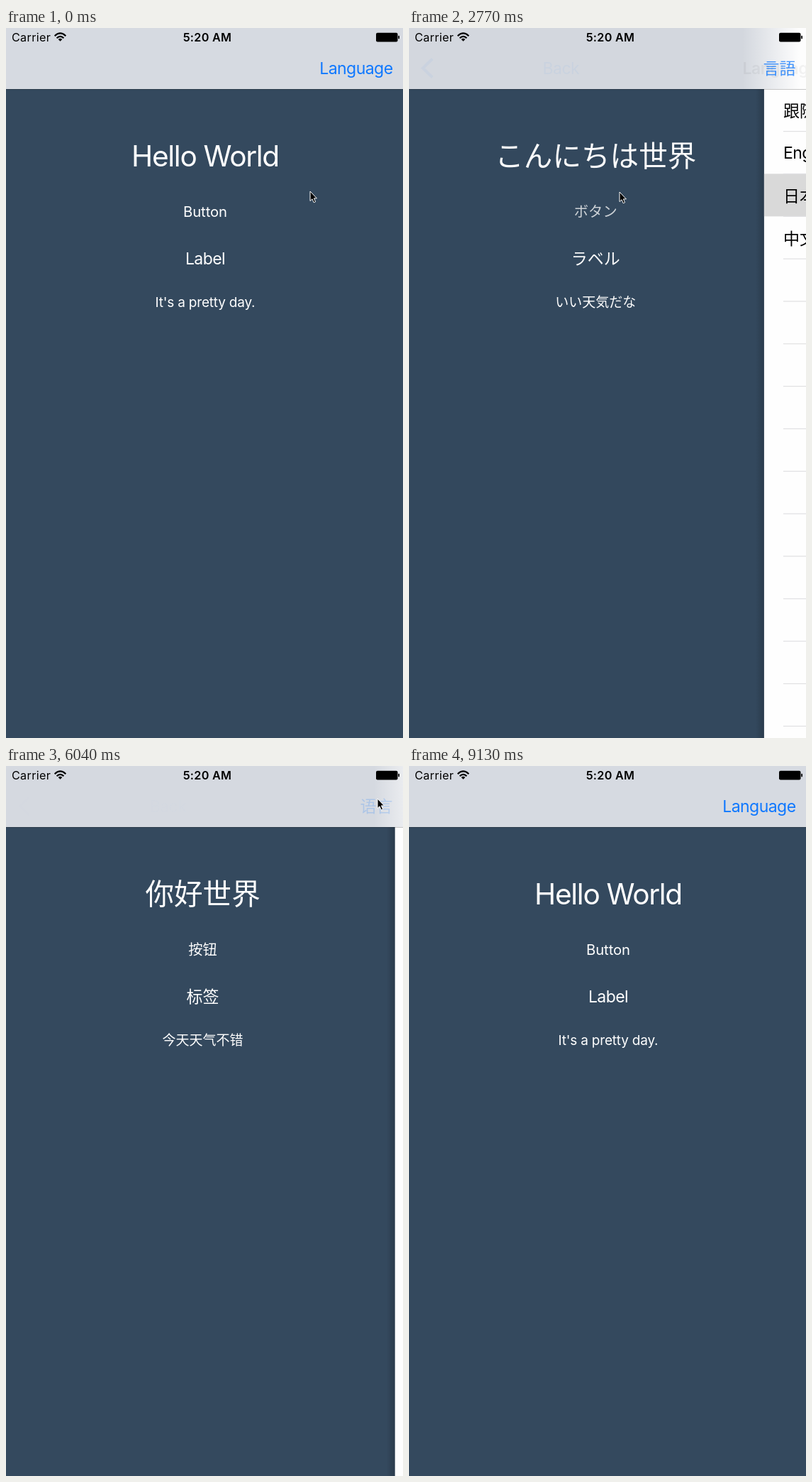
These frames come from a looping animation (560 by 1000 pixels, 9760 ms). An HTML page:

```html
<!DOCTYPE html>
<html lang="en">
<head>
<meta charset="utf-8">
<title>Language switch</title>
<style>
  html, body { margin: 0; height: 100%; overflow: hidden; background: #34495e; }
  svg { display: block; width: 100vw; height: 100vh; font: 23px Inter, "Noto Sans CJK SC", sans-serif; font-optical-sizing: none; }
  text { white-space: pre; }
  .mid { text-anchor: middle; }
  .end { text-anchor: end; }
  .tint { fill: #0f78ff; }
  .en { letter-spacing: -.55px; }
  .ja { font-family: "Noto Sans CJK JP", sans-serif; }
  .zh { font-family: "Noto Sans CJK SC", sans-serif; }
  #heading { font-size: 40.6px; font-weight: 300; }
  #heading.en { font-weight: 400; letter-spacing: -1.3px; }
  #button, #dots { font-size: 20.3px; }
  #button.en { letter-spacing: -.1px; }
  #note { font-size: 19px; }
  #note.en { letter-spacing: -.2px; }
  #title { font-weight: 600; }
  .status { font-size: 16.2px; letter-spacing: .3px; }
</style>
</head>
<body>
<svg viewBox="0 0 560 1000" preserveAspectRatio="none">
  <defs>
    <linearGradient id="glass" gradientUnits="userSpaceOnUse" x1="0" y1="0" x2="80" y2="0">
      <stop offset="0" stop-color="#fdfdfd" stop-opacity="0"/>
      <stop offset="1" stop-color="#fdfdfd"/>
    </linearGradient>
    <linearGradient id="edge">
      <stop offset="0" stop-opacity="0"/>
      <stop offset="1" stop-opacity=".2"/>
    </linearGradient>
  </defs>

  <rect width="560" height="1000" fill="#34495e"/>
  <g id="main" class="mid" fill="#fff">
    <text id="heading" x="281" y="195"/>
    <text id="button" x="281" y="266"/>
    <text id="dots" x="281" y="266" opacity=".2">...</text>
    <text id="label" x="281" y="333"/>
    <text id="note" x="281" y="393"/>
  </g>
  <rect id="dim" width="560" height="1000"/>

  <g id="list">
    <rect id="shadow" x="-12" width="12" height="1000" fill="url(#edge)"/>
    <rect width="560" height="1000" fill="#fefefe"/>
    <rect id="pick" width="560" height="60" fill="#d9d9d9"/>
    <g id="rows"></g>
  </g>

  <rect width="560" height="86" fill="#d6dae1"/>
  <rect id="barDim" width="560" height="86"/>
  <rect id="barGlass" width="560" height="86" fill="url(#glass)"/>
  <rect y="86" width="560" height="1" fill="#000" opacity=".22"/>
  <text id="item" class="end tint" x="545.5" y="64.7"/>
  <text id="title" class="mid" x="281" y="64.7"/>
  <path id="chevron" d="M33 43.5L19.5 56.5L33 69.5" fill="none" stroke="#0f78ff" stroke-width="4"/>
  <text id="back" class="en tint" x="41" y="64.7">Back</text>

  <g class="status">
    <text x="8" y="19">Carrier</text>
    <text x="284" y="19" class="mid" font-weight="600">5:20 AM</text>
    <g fill="none" stroke="#000" stroke-width="2.2">
      <path d="M68.7 11.2Q76.5 3.6 84.3 11.2"/>
      <path d="M71.6 14.2Q76.5 9.4 81.4 14.2"/>
    </g>
    <path d="M73.7 15.9Q76.5 13.4 79.3 15.9L76.5 18.8Z"/>
    <rect x="522" y="6.8" width="30.5" height="12.6" rx="2"/>
    <rect x="553.3" y="10.8" width="1.7" height="4.6" rx=".8"/>
  </g>
  <path id="cursor" d="M0 0V13.6L3 10.8L5.2 15.8L7.6 14.7L5.4 9.9H9.4Z" stroke="#fff" stroke-width="1"/>
</svg>

<script>
const LOOP = 9760, WIDTH = 560, ROW = 59.84;
const $ = id => document.getElementById(id);

const words = {
  en: { heading: "Hello World", button: "Button", label: "Label", note: "It's a pretty day.", nav: "Language" },
  ja: { heading: "こんにちは世界", button: "ボタン", label: "ラベル", note: "いい天気だな", nav: "言語" },
  zh: { heading: "你好世界", button: "按钮", label: "标签", note: "今天天气不错", nav: "语言" }
};
const rows = [["zh", "跟随系统"], ["en", "English"], ["ja", "日本語"], ["zh", "中文"]];

// Each visit to the list: when it slides in and out, and what is picked.
const visits = [
  { push: 1240, pop: 2576, from: "en", to: "ja", row: 2 },
  { push: 3915, pop: 5016, from: "ja", to: "zh", row: 3 },
  { push: 6030, pop: 6936, from: "zh", to: "en", row: 1 }
];
const TAP_LEAD = 50;

// Pointer path: time, x, y
const path = [
  [0, 429, 230], [500, 429, 230], [660, 450, 165], [840, 481, 66],
  [1400, 481, 66], [1520, 421, 92], [1660, 385, 122], [2050, 307, 218], [2410, 297, 231],
  [2980, 297, 231], [3300, 440, 125], [3570, 517, 50], [3780, 517, 50],
  [3930, 454, 124], [4170, 330, 265], [4400, 262, 325], [4550, 262, 320],
  [5480, 262, 320], [5770, 524, 46], [6080, 524, 46], [6330, 342, 140], [6480, 300, 168], [6750, 291, 176],
  [8240, 291, 176], [8500, 371, 799], [8600, 371, 799], [9110, 496, 1003], [LOOP, 496, 1003]
];

$("rows").innerHTML = Array.from({ length: 15 }, (_, i) => {
  const [lang, name] = rows[i] || ["en", ""];
  return `<text class="${lang}" x="27" y="${(lang === "en" ? 124.5 : 125.2) + ROW * i}">${name}</text>
    <rect x="27" y="${145 + ROW * i}" width="533" height="1.2" fill="#e0e0e2"/>`;
}).join("");

const clamp = v => Math.max(0, Math.min(1, v));
const shift = (id, x, y = 0) => $(id).setAttribute("transform", `translate(${x} ${y})`);
const fade = (id, alpha) => $(id).setAttribute("opacity", alpha);

// Critically damped spring from 0 to 1
function spring(ms) {
  const u = Math.max(0, ms) * .0196;
  return u > 11 ? 1 : 1 - (1 + u) * Math.exp(-u);
}

function say(id, lang, text) {
  const el = $(id);
  if (el.textContent === text) return;
  el.textContent = text;
  el.classList.remove("en", "ja", "zh");
  el.classList.add(lang);
}

function pointer(t) {
  const i = path.findIndex(p => p[0] > t);
  const [a, b] = [path[i - 1], path[i]];
  const k = (t - a[0]) / (b[0] - a[0]);
  return [a[1] + (b[1] - a[1]) * k, a[2] + (b[2] - a[2]) * k];
}

function draw(t) {
  const visit = visits.filter(v => t >= v.push - TAP_LEAD).pop();
  const v = visit || { push: LOOP, pop: LOOP, from: "en", to: "en", row: 0 };
  const enter = spring(t - v.push), leave = spring(t - v.pop);
  const shown = enter * (1 - leave), x = WIDTH * (1 - shown);
  const popping = t >= v.pop, lang = popping ? v.to : v.from;
  const arrive = clamp((leave - .55) / .45);

  for (const id of ["heading", "button", "label", "note"]) say(id, lang, words[lang][id]);
  say("item", lang, words[lang].nav);
  say("title", v.from, words[v.from].nav);

  shift("main", -168 * shown);
  fade("dim", .1 * shown);
  fade("button", popping ? arrive : 1);
  fade("dots", popping && leave < .7 ? .2 : 0);

  shift("list", x);
  fade("list", shown ? 1 : 0);
  fade("shadow", 1 - shown * .8);
  $("pick").setAttribute("y", 85.7 + ROW * v.row);
  fade("pick", popping ? 1 : 0);

  fade("barDim", .1 * shown);
  fade("barGlass", shown ? 1 : 0);
  $("glass").setAttribute("gradientTransform", `translate(${x - 30 - 50 * shown * shown})`);

  const navAlpha = shown ** 1.4;
  for (const id of ["title", "back", "chevron"]) fade(id, navAlpha);
  shift("title", (popping ? 271 : 308) * (1 - shown));
  shift("back", 165 * (1 - shown));
  fade("item", !visit ? 1 : popping ? arrive : .2 * (1 - enter));

  shift("cursor", ...pointer(t));
}

const start = performance.now();
function frame() {
  draw((performance.now() - start) % LOOP);
  requestAnimationFrame(frame);
}
frame();
</script>
</body>
</html>
```
